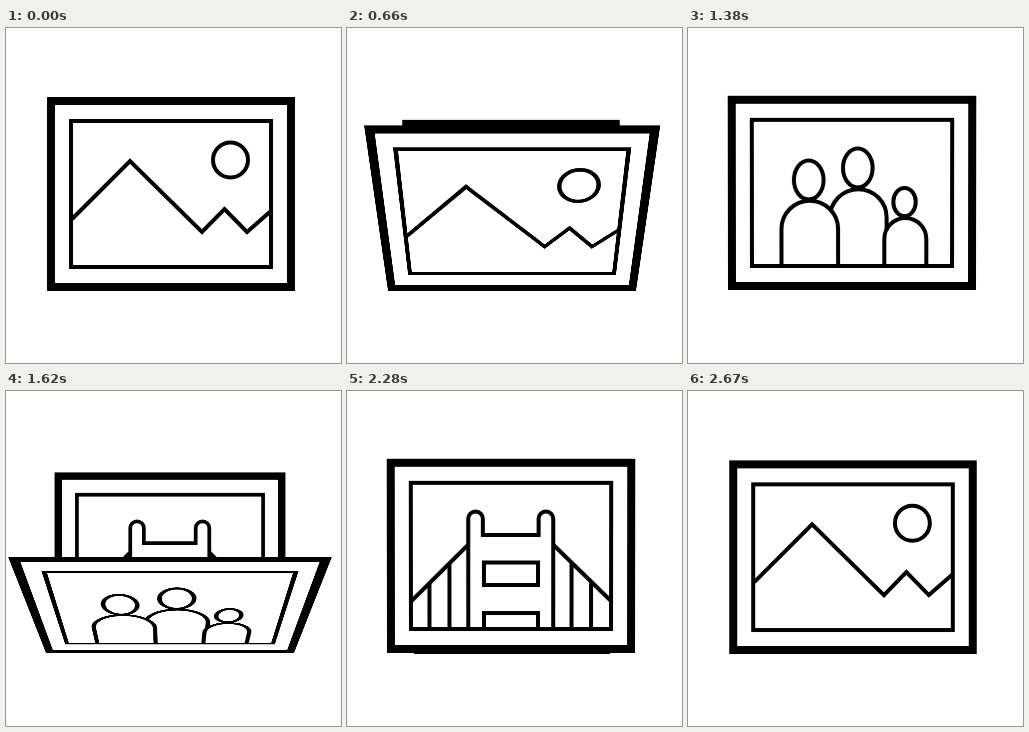
An HTML page for the animation above (2.7 s loop, 335x335 px).

```html
<!DOCTYPE html>
<html lang="en">
<head>
<meta charset="utf-8">
<title>Picture frames</title>
<style>
  html, body { margin: 0; width: 100%; height: 100%; overflow: hidden; background: #fff; }
  #stage {
    position: relative; width: 335px; height: 335px; overflow: hidden;
    perspective: 722px; perspective-origin: 164px 166px;
  }
  .card {
    position: absolute; left: 0; top: 0; width: 335px; height: 335px;
    overflow: visible; visibility: hidden; transform-origin: 164px 262px;
    fill: none; stroke: #000; stroke-width: 4;
  }
  #hills { left: 1px; top: 1px; }
  .solid { fill: #fff; }
</style>
</head>
<body>
<div id="stage">
  <svg class="card" id="hills" viewBox="0 0 335 335">
    <use href="#frame"/>
    <path d="M65 190 L123 132 L195 203 L217.5 180 L240 203 L264.5 181.5"/>
    <circle cx="223.5" cy="131" r="17.5"/>
  </svg>

  <svg class="card" viewBox="0 0 335 335">
    <defs>
      <g id="frame">
        <rect class="solid" x="44" y="72" width="240" height="186" stroke-width="8"/>
        <rect x="64" y="92" width="200" height="146"/>
      </g>
    </defs>
    <use href="#frame"/>
    <g class="solid">
      <path d="M142 238 V189.5 a28.3 28.3 0 0 1 56.6 0 V238"/>
      <ellipse cx="169.8" cy="140" rx="14.8" ry="19.5"/>
      <path d="M93.5 238 V201 a28.3 28.3 0 0 1 56.6 0 V238"/>
      <ellipse cx="120.8" cy="152" rx="14.8" ry="19.5"/>
      <path d="M196.3 238 V211 a21 21 0 0 1 42 0 V238"/>
      <ellipse cx="216.5" cy="174" rx="11.2" ry="14"/>
    </g>
    <path d="M62 238 H266"/>
  </svg>

  <svg class="card" viewBox="0 0 335 335">
    <use href="#frame"/>
    <path d="M121.3 238 V127.8 a7.3 7.3 0 0 1 14.6 0 V144 H191.6 V127.8 a7.3 7.3 0 0 1 14.6 0 V238"/>
    <path d="M137 171.5 H191 V194 H137 Z M137 238 V222 H191 V238"/>
    <path d="M64.5 210 L121 154 M206.5 154 L264 210"/>
    <path d="M82.5 192 V238 M102.5 172.5 V238 M224.5 172 V238 M244 191 V238"/>
  </svg>
</div>
<script>
  const SLOT = 900, HOLD = 480, STEP = 30, STEPS = 15;
  const LAG = 0.145, POWER = 2.1, START_SCALE = 0.79;
  const cards = [...document.querySelectorAll('.card')];

  function ease(u) {
    return u < 0.5 ? (2 * u) ** POWER / 2 : 1 - (2 - 2 * u) ** POWER / 2;
  }

  function show(card, z, transform) {
    card.style.visibility = 'visible';
    card.style.zIndex = z;
    card.style.transform = transform;
  }

  function draw(time) {
    const t = time % (SLOT * cards.length);
    const index = Math.floor(t / SLOT);
    const phase = t % SLOT;
    const front = cards[index];
    const back = cards[(index + 1) % cards.length];
    for (const card of cards) card.style.visibility = 'hidden';

    if (phase < HOLD) {
      show(front, 2, 'none');
      return;
    }
    // The front card tips over its bottom edge while the next one grows behind it.
    const step = Math.floor((phase - HOLD) / STEP) + 1;
    const p = ease((step - LAG) / STEPS);
    show(back, 1, `scale(${1 - (1 - START_SCALE) * (1 - p)})`);
    if (p < 0.93) show(front, 2, `rotateX(${-90 * p}deg)`);
  }

  let start;
  function tick(now) {
    start ??= now;
    draw(now - start);
    requestAnimationFrame(tick);
  }
  draw(0);
  requestAnimationFrame(tick);
</script>
</body>
</html>
```
